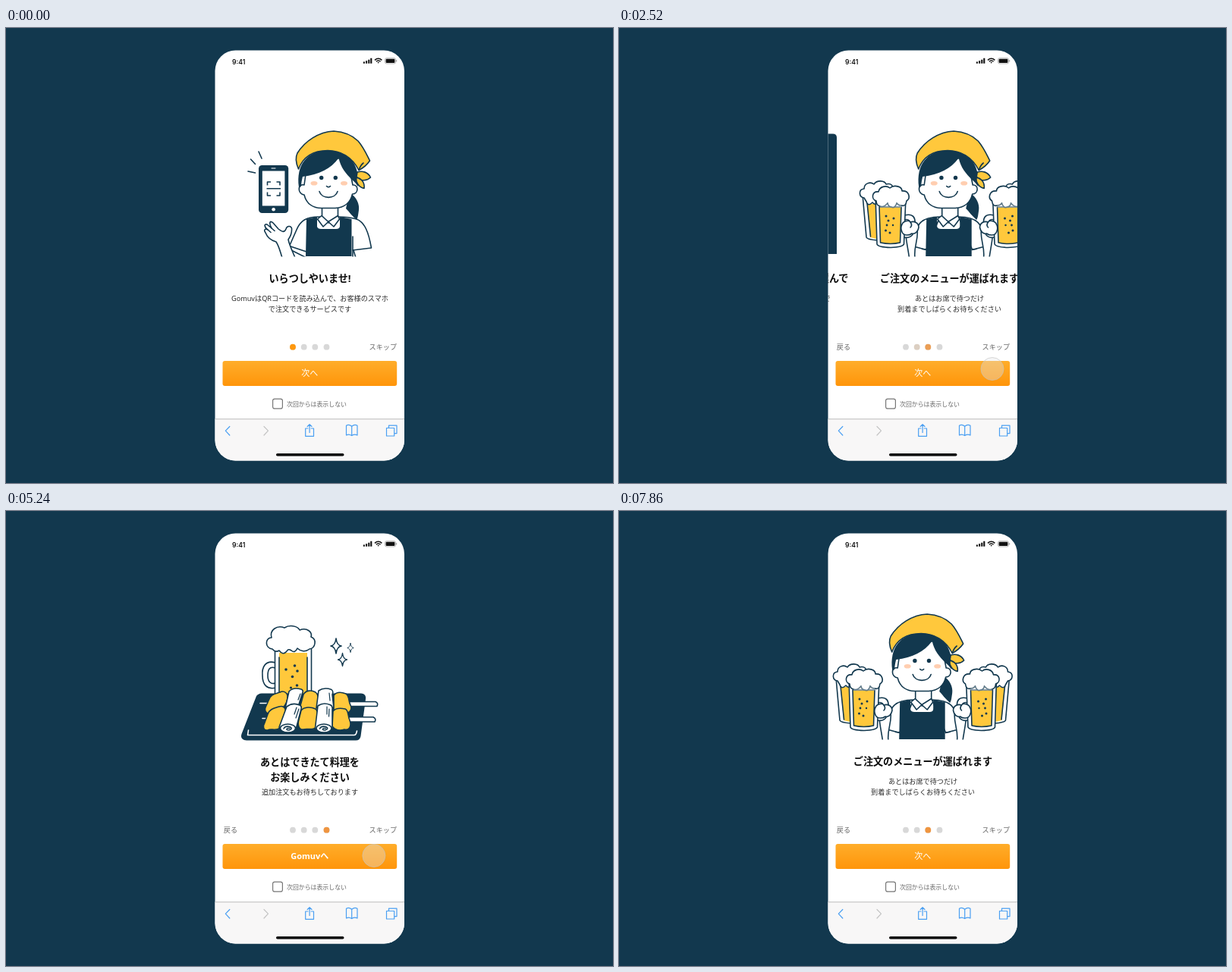
Recreate the animation shown at these times as an HTML page. Size 800x600 px, loop 8.34 s.

```html
<!DOCTYPE html>
<html lang="ja">
<head>
<meta charset="utf-8">
<title>Onboarding</title>
<style>
  html, body { margin: 0; width: 100%; height: 100%; overflow: hidden; background: #12384e; }
  svg { display: block; width: 100vw; height: 100vh; }
  text { font-family: "Noto Sans", "Noto Sans CJK JP", "Noto Sans CJK", sans-serif; font-size: 9.15px; fill: #2b2b2b; }
  .mid text, text.mid { text-anchor: middle; }
  .mid .head { font-size: 13.1px; font-weight: 700; fill: #0c0c0c; }
  text.grey { fill: #666; }
  text.label { font-size: 11px; font-weight: 700; fill: #fff; }
  .art { stroke: #12384e; stroke-width: 1.6; fill: none; stroke-linecap: round; stroke-linejoin: round; }
  .n { fill: #12384e; stroke: none; }
  .w { fill: #fff; }
  .y { fill: #ffc83c; }
  .p { fill: #ffceb0; stroke: none; }
  .white { stroke: #fff; }
  .bare { stroke: none; }
  .icon { fill: none; stroke: #4a9ff2; stroke-width: 1.2; stroke-linejoin: round; stroke-linecap: round; }
</style>
</head>
<body>
<svg viewBox="0 0 800 600">
  <defs>
    <clipPath id="screen"><rect x="275.5" y="29.5" width="249.5" height="541" rx="27"/></clipPath>
    <clipPath id="waist"><rect x="200" y="100" width="400" height="201.5"/></clipPath>
    <clipPath id="row"><rect x="350" y="245" width="102" height="25"/></clipPath>
    <linearGradient id="amber" x1="0" y1="0" x2="0" y2="1">
      <stop offset="0" stop-color="#ffad2a"/><stop offset="1" stop-color="#ff950a"/>
    </linearGradient>

    <g id="girl">
      <path class="n" d="M453 217C462 223 466 232 465 240C464 246 464 250 462 253C456 248 452 242 448 238Z"/>
      <path class="w" d="M416.500 234V248L425 257L437.500 248V234Z"/>
      <path class="n" d="M396 252L410 249V262Q411 265 415 265H435Q440 265 440 261V249L455.500 252V301H395Z"/>
      <path class="w" d="M416 247.500L424.800 255.500L418 262L410.500 252ZM437.500 247.500L424.800 255.500L432 262L439.500 252Z"/>
      <path class="w" d="M393 207C384 205 384 219 393 220C396 232 405 238 417 237.500H434C446 237 454 230 456.500 219C465 219 465 206 457 207L450 172H398Z"/>
      <path class="n" d="M386 210C382 180 397 162 424 161C450 161 467 178 464 209Q460 203 456 200C448 192 441 184 438.500 171.500C428 186 413 193 391 196Q389 204 389 209Z"/>
      <path class="y" d="M463 190C470 188 477 190 480.500 197C474 203 467 201 462 196ZM461.500 197C468 198 473 203 472 211.500C465 210 461 204 461.500 197Z"/>
      <path class="y" d="M385.500 186C382 178 381 171 384 165C394 149 412 137 432 136C447 137 458 143 464 149C471 157 475 166 479.500 175Q474 183 465 187.500C456 170 441 161.500 424 161.500C406 161.500 392 169 385.500 186Z"/>
      <path d="M465 187.500Q467 181 471 178"/>
      <circle class="n" cx="415.700" cy="197.500" r="2.700"/><circle class="n" cx="434.300" cy="197.500" r="2.700"/>
      <ellipse class="p" cx="406" cy="204.700" rx="4.500" ry="2.800"/><ellipse class="p" cx="445.500" cy="204.700" rx="4.500" ry="2.800"/>
      <path d="M422.500 208.500Q425 211 427.500 208.500M413 215.500C416 226 434 226 437 215.500"/>
    </g>

    <g id="mugs">
      <path class="w" d="M286 220L291 276Q292 279 306 280V218Z"/>
      <path class="y bare" d="M292 232H304V278L296 276Z"/>
      <path d="M292 231L296.500 275"/>
      <path class="w" d="M288 224C281 223 280 213 288 212C288 205 296 202 301 206C305 200 315 201 317 206C324 204 327 209 326 213L308 226Q304 236 299 230Q293 236 291 229Z"/>
      <path class="w" d="M341 247C353 244 356 250 355 260C355 272 350 278 340 276M341 253C347 251 349 255 349 260C349 267 347 271 341 270"/>
      <path class="w" d="M303 222L305 285Q306 289 323 289.500Q339 289 340.500 285L343 222Z"/>
      <path class="y" d="M308 236H337L335.500 283Q323 286 309.500 283Z"/>
      <path class="w" d="M304 228C297 226 298 215 307 216C308 209 317 207 322 211C328 206 338 209 338 215C347 214 350 224 344 228Q343 236 337 234Q333 234 331 231Q329 238 324 236Q320 236 319 231Q314 237 309 235Q304 234 304 228Z"/>
      <path class="bare w" d="M309 231H337V237H309Z" opacity=".35"/>
      <g class="n"><circle cx="317" cy="248" r="1.500"/><circle cx="327" cy="251" r="1.500"/><circle cx="320" cy="254" r="1.500"/><circle cx="318" cy="260" r="1.400"/><circle cx="316.500" cy="267" r="1.500"/><circle cx="322" cy="270" r="1.500"/><circle cx="326" cy="260" r="1.200"/></g>
    </g>

    <g id="holding">
      <path class="w" d="M388 249C370 249 361 254 358 264L360 291L370 292Z"/>
      <path class="bare w" d="M341 270L348 303H366L359 264Z"/>
      <path d="M343 273C344 284 346 292 347.500 303M358 266C360 278 353 289 355 303M357 289L370 292.500"/>
      <use href="#mugs"/>
      <path class="w" d="M339 257C343 253 348 254 349 256C354 254 360 257 360 263C359 269 355 272 351 271C347 274 340 274 338 269C336 265 337 260 339 257Z"/>
      <path d="M349 256Q352 260 349 263"/>
    </g>

    <g id="card">
      <rect class="w" x="356" y="181" width="42" height="63.500"/>
      <path d="M356 218H398M356 181L398 218M398 181L356 218"/>
      <path d="M360 223.500H393M360 228H380" stroke-width="2.800" stroke-linecap="butt"/>
      <rect class="w" x="360.200" y="233" width="11.500" height="8"/>
      <rect class="y" x="376" y="233" width="17" height="8"/>
      <g clip-path="url(#row)"><path d="M356 280V251H398V280M356 251L377 270L398 251M356 289L377 270L398 289"/></g>
    </g>

    <path id="chicken" class="y" d="M346 250C348 242 355 241 361 239C367 236 372 241 371 246C371 254 366 257 364 262C360 267 355 264 350 266C345 269 340 265 342 259Z"/>
    <path id="spark" class="w" d="M0 -10Q1 -1 7 0Q1 1 0 10Q-1 1 -7 0Q-1 -1 0 -10Z"/>
  </defs>

  <rect width="800" height="600" fill="#12384e"/>
  <g clip-path="url(#screen)">
    <rect x="275" y="29" width="251" height="542" fill="#fff"/>

    <g class="page">
      <g class="art" clip-path="url(#waist)">
        <path d="M333 163L337 172M322.500 173L328.500 179.500M319 189L328.500 191"/>
        <rect class="n" x="333" y="181" width="39.200" height="63" rx="4.500"/>
        <rect class="bare w" x="337.800" y="188.500" width="29.600" height="46"/>
        <circle class="bare w" cx="352.600" cy="239.300" r="2.300"/>
        <path class="white" d="M350 185H355" stroke-width="1"/>
        <path d="M349 203H344.500V207.500M356.500 203H361V207.500M349 221H344.500V216.500M356.500 221H361V216.500M343.500 211.800H362" stroke-linecap="butt"/>
        <path class="w" d="M412 249C396 249 388 254 383 266L372 291L396 303H457V293L481.500 290C478 270 473 256 462 252Q452 249 438 249Z"/>
        <path d="M372 287L396 295M457 275V293M458 293L461 303"/>
        <path class="w" d="M364 303C361 294 360 288 356 282C349 280 344 275 342 270C339 266 342 264 345 266C340 262 340 258 344 259L350 264C346 257 348 253 352 257L359 265C364 269 367 270 369 265C370 261 375 260 376.500 264C377 270 375 275 372 279C374 288 378 295 381 303Z"/>
        <path d="M345 266L349 269.500M350 264L354 267.500"/>
        <use href="#girl"/>
      </g>
      <g class="mid">
        <text class="head" x="400.500" y="335.400">いらつしやいませ!</text>
        <text x="400.500" y="360.300">GomuvはQRコードを読み込んで、お客様のスマホ</text>
        <text x="400.500" y="374.300">で注文できるサービスです</text>
      </g>
    </g>

    <g class="page">
      <g class="art">
        <path class="n" d="M338.800 298V144.500Q338.800 139.500 344 139.500H458Q463.300 139.500 463.300 144.500V298Z"/>
        <rect class="bare w" x="351.500" y="160" width="98.500" height="138"/>
        <circle class="bare w" cx="400.800" cy="150.800" r="2.900"/>
        <path d="M351 174.500H450"/>
        <use href="#card"/><use href="#card" x="48"/>
        <path d="M351 270.500H450"/>
        <path d="M356 278.700H382M403.500 278.200H445" stroke-width="5" stroke-linecap="butt"/>
        <rect class="y" x="357" y="285.500" width="87.500" height="9"/>
      </g>
      <g class="mid">
        <text class="head" x="400.500" y="335.400">食べたいメニューを選んで</text>
        <text x="400.500" y="360.300">お好きなメニューを選んで</text>
        <text x="400.500" y="374.300">カートに追加してださい</text>
      </g>
    </g>

    <g class="page">
      <g class="art" clip-path="url(#waist)">
        <use href="#holding"/>
        <use href="#holding" transform="translate(800.500 0) scale(-1 1)"/>
        <use href="#girl" x="-25.800"/>
      </g>
      <g class="mid">
        <text class="head" x="400.500" y="335.400">ご注文のメニューが運ばれます</text>
        <text x="400.500" y="360.300">あとはお席で待つだけ</text>
        <text x="400.500" y="374.300">到着までしばらくお待ちください</text>
      </g>
    </g>

    <g class="page">
      <g class="art">
        <path class="w" d="M355 200C342 196 337 206 338 217C338 229 344 236 356 233M355 207C347 204 345 210 345 217C345 225 349 229 355 227"/>
        <path class="w" d="M354.500 175V246H402.500V175Z"/>
        <path class="y bare" d="M360 187H397V246H360Z"/>
        <path d="M360 193V244M397 193V244"/>
        <path class="w" d="M351 182C341 181 341 167 350 167C347 157 357 150 367 154C373 150 384 151 387 157C397 153 404 160 402 166C410 169 408 181 400 182C394 187 387 184 384 181Q381 188 376 184Q372 181 370 185Q365 191 360 184Q355 187 351 182Z"/>
        <g class="n"><circle cx="369" cy="209" r="1.800"/><circle cx="380.500" cy="204" r="1.800"/><circle cx="384" cy="211" r="1.800"/><circle cx="377.500" cy="218.500" r="1.800"/><circle cx="383.500" cy="230" r="1.800"/><circle cx="375.500" cy="233" r="1.600"/></g>
        <path class="n" d="M330 244Q333 240 338 240.500H468Q475 241 474 248L467.500 297Q466.500 302.500 461 302.500H317Q308 302 310.500 294Z"/>
        <path class="white" d="M319.500 289L318.500 295.500H459Q461.500 295.500 462.500 290M335 253.500H346M338 273.500H346"/>
        <path class="w" d="M446 251.500H487Q491 253 489 257.500H446Z"/>
        <use href="#chicken"/>
        <path class="w" d="M373 238Q378 232 389 235Q392 236 391 239L385 258L368 260Z"/>
        <path class="y" d="M392 242C395 236 403 236 408 239C413 243 412 252 410 264H386Z"/>
        <path class="w" d="M412 237Q419 232 429 235.500Q432 238 430 242L432 260H409Z"/>
        <path class="y" d="M432 243C436 238 443 239 448 241C453 244 451 251 454 256C457 262 452 267 447 266L432 264Z"/>
        <path d="M388 241L385 249M426 240L427 250" stroke-width="1.200"/>
        <path class="w" d="M446 271.800H484Q488.500 274 486 278H446Z"/>
        <path class="y" d="M345 268C347 261 354 260 360 258C366 256 370 261 368 268C367 276 361 280 361 286C355 291 349 286 345 289C339 290 338 284 341 279Z"/>
        <path class="y" d="M389 263C393 258 402 258 408 261C413 266 411 277 409 285C404 290 397 286 392 288C386 289 384 282 386 275Z"/>
        <path class="y" d="M431 264C435 259 442 260 447 261C452 263 450 270 453 276C456 284 452 290 446 288C440 290 434 289 430 284Z"/>
        <path class="w" d="M370 258Q378 252 387 256Q390 257 389 261L382 288Q379 293 371 292.500Q361 292 360 285Z"/>
        <path class="w" d="M411 257Q418 252 427 255.500Q431 257 430 262V287Q428 293 419 292.500Q409 292 407.500 286Z"/>
        <path d="M386 261L382 273M383 259L380 268M426 261L425.500 271M423 258V268" stroke-width="1.200"/>
        <g id="ends"><ellipse class="w" cx="371.500" cy="286.500" rx="10" ry="5.500"/><path d="M366 287Q368 283 374 284.500Q379 287 373 289Q368 289 371 286.500H374"/></g>
        <use href="#ends" x="47.500"/>
        <use href="#spark" x="435" y="178"/>
        <use href="#spark" transform="translate(454 180.500) scale(.6)"/>
        <use href="#spark" transform="translate(443.500 196) scale(.85)"/>
      </g>
      <g class="mid">
        <text class="head" x="400.500" y="335.900">あとはできたて料理を</text>
        <text class="head" x="400.500" y="356.200">お楽しみください</text>
        <text x="400.500" y="374.300">追加注文もお待ちしております</text>
      </g>
    </g>

    <text x="298" y="47.800" style="font:600 8.600px Inter,sans-serif;fill:#111">9:41</text>
    <path d="M471.900 46.800V44.600M475.100 46.800V43.200M478.300 46.800V41.700M481.300 46.800V39.700" stroke="#111" stroke-width="2.100"/>
    <g fill="none" stroke="#111" stroke-width="1.500"><path d="M486 42.400Q490.700 38 495.400 42.400M487.800 44.300Q490.700 41.600 493.600 44.300"/><path d="M489.400 45L490.700 46.800L492 45Z" fill="#111" stroke="none"/></g>
    <rect x="499.500" y="39.700" width="14" height="7.300" rx="2" fill="#fff" stroke="#999" stroke-width=".7"/>
    <rect x="500.600" y="40.800" width="11.800" height="5.100" rx="1" fill="#111"/>
    <path d="M514.700 42.200V44.500" stroke="#999"/>

    <g id="dots"></g>
    <text id="back" class="grey" x="286.800" y="424">戻る</text>
    <text class="grey" x="478.500" y="424">スキップ</text>
    <rect x="285.500" y="439" width="229.700" height="33" rx="3" fill="url(#amber)"/>
    <text id="next" class="label mid" x="400.300" y="459.400" style="font-weight:500">次へ</text>
    <text id="enter" class="label mid" x="400.300" y="459.400">Gomuvへ</text>
    <rect x="351.600" y="489.100" width="12.800" height="12.800" rx="2.500" fill="#fff" stroke="#777" stroke-width="1.200"/>
    <text class="grey" x="370" y="498.600" style="font-size:7.900px">次回からは表示しない</text>

    <rect x="275" y="515.500" width="251" height="56" fill="#f8f7f7"/>
    <path d="M275 515.700H526" stroke="#bdbdbd"/>
    <g class="icon">
      <path d="M294.800 525.500L289.300 531.200L294.800 537"/>
      <path d="M340 525.500L345.500 531.200L340 537" stroke="#c4c4c4"/>
      <path d="M398 528H394.700V538.300H405.500V528H402.200M400.100 533.500V522.800M397.200 525.500L400.100 522.600L403 525.500"/>
      <path d="M455.700 525.200Q452 522 448.500 524.300V537Q452 535 455.700 537.500Q459.500 535 463 537V524.300Q459.500 522 455.700 525.200V537.500"/>
      <path d="M501.500 527.500H511.700V538H501.500ZM504.500 527.500V524.200H515V534.600H511.700"/>
    </g>
    <rect x="356" y="561" width="89.500" height="3.600" rx="1.800" fill="#050505"/>
  </g>

  <circle id="touch" r="15" fill="#e6e6e6" fill-opacity=".36" stroke="#c4c4c4" stroke-opacity=".65"/>
</svg>

<script>
const LOOP = 8340, SLIDE = 350;
const $ = id => document.getElementById(id);
const clamp = v => Math.min(1, Math.max(0, v));
const pages = [...document.querySelectorAll('.page')];

// Left and right extent of each page: it travels just past the screen edge.
const spans = [[296, 505], [323, 480], [282, 518], [310, 490]];
// Tap times and direction of each page change.
const taps = [[1125, 1], [2325, 1], [4345, 1], [6308, -1]];
// start, end, control x, y, end x, y
const legs = [
  [40, 580, 651, 215, 492, 444.5],
  [765, 840, 492, 447, 492, 449.5],
  [3265, 3360, 490, 451, 487, 452.5],
  [3505, 3600, 486, 453.5, 485, 454.5],
  [5225, 6040, 395, 464, 304.3, 424.5],
  [6065, 6140, 302, 424, 300.6, 423.5],
  [6865, 7860, 468, 500, 738, -18]
];

const dots = [378, 392.7, 407.3, 422.5].map((x, i) => {
  const add = fill => {
    const c = document.createElementNS('http://www.w3.org/2000/svg', 'circle');
    Object.entries({ cx: x, cy: 420.7, r: 3.9, fill }).forEach(([k, v]) => c.setAttribute(k, v));
    return $('dots').appendChild(c);
  };
  add('#d8d8d8');
  return add(i ? '#ef9540' : '#ff980d');
});

// cubic-bezier(.25, .1, .25, 1)
function ease(u) {
  if (u <= 0 || u >= 1) return clamp(u);
  let lo = 0, hi = 1;
  for (let i = 0; i < 24; i++) {
    const s = (lo + hi) / 2;
    if (.75 * s * (1 - s) + s ** 3 < u) lo = s; else hi = s;
  }
  return .3 * lo * (1 - lo) ** 2 + 3 * lo * lo * (1 - lo) + lo ** 3;
}
const inOut = u => u < .5 ? 2 * u * u : 1 - 2 * (1 - u) ** 2;

function touchAt(t) {
  let x = 812, y = -18;
  for (const [t0, t1, cx, cy, ex, ey] of legs) {
    if (t < t0) break;
    const s = inOut(clamp((t - t0) / (t1 - t0))), r = 1 - s;
    x = r * r * x + 2 * r * s * cx + s * s * ex;
    y = r * r * y + 2 * r * s * cy + s * s * ey;
  }
  return [x, y];
}

function draw(t) {
  const pos = taps.reduce((sum, [at, dir]) => sum + dir * ease((t - at) / SLIDE), 0);
  pages.forEach((page, i) => {
    const d = i - pos, [left, right] = spans[i];
    const x = d > 0 ? d * (525 - left) : d * (right - 274);
    page.setAttribute('transform', `translate(${x} 0)`);
    page.setAttribute('visibility', Math.abs(d) < 1 ? 'visible' : 'hidden');
    dots[i].setAttribute('opacity', clamp(1 - Math.abs(d)));
  });
  const last = clamp(pos - 2);
  $('back').setAttribute('opacity', clamp(pos));
  $('enter').setAttribute('opacity', last);
  $('next').setAttribute('opacity', 1 - last);

  const [x, y] = touchAt(t);
  const press = taps.reduce((sum, [at]) => sum + Math.sin(Math.PI * clamp((t - at) / 140)), 0);
  $('touch').setAttribute('transform', `translate(${x} ${y}) scale(${1 - .07 * press})`);
}

const begin = performance.now();
function tick() {
  draw((performance.now() - begin) % LOOP);
  requestAnimationFrame(tick);
}
draw(0);
tick();
</script>
</body>
</html>
```
